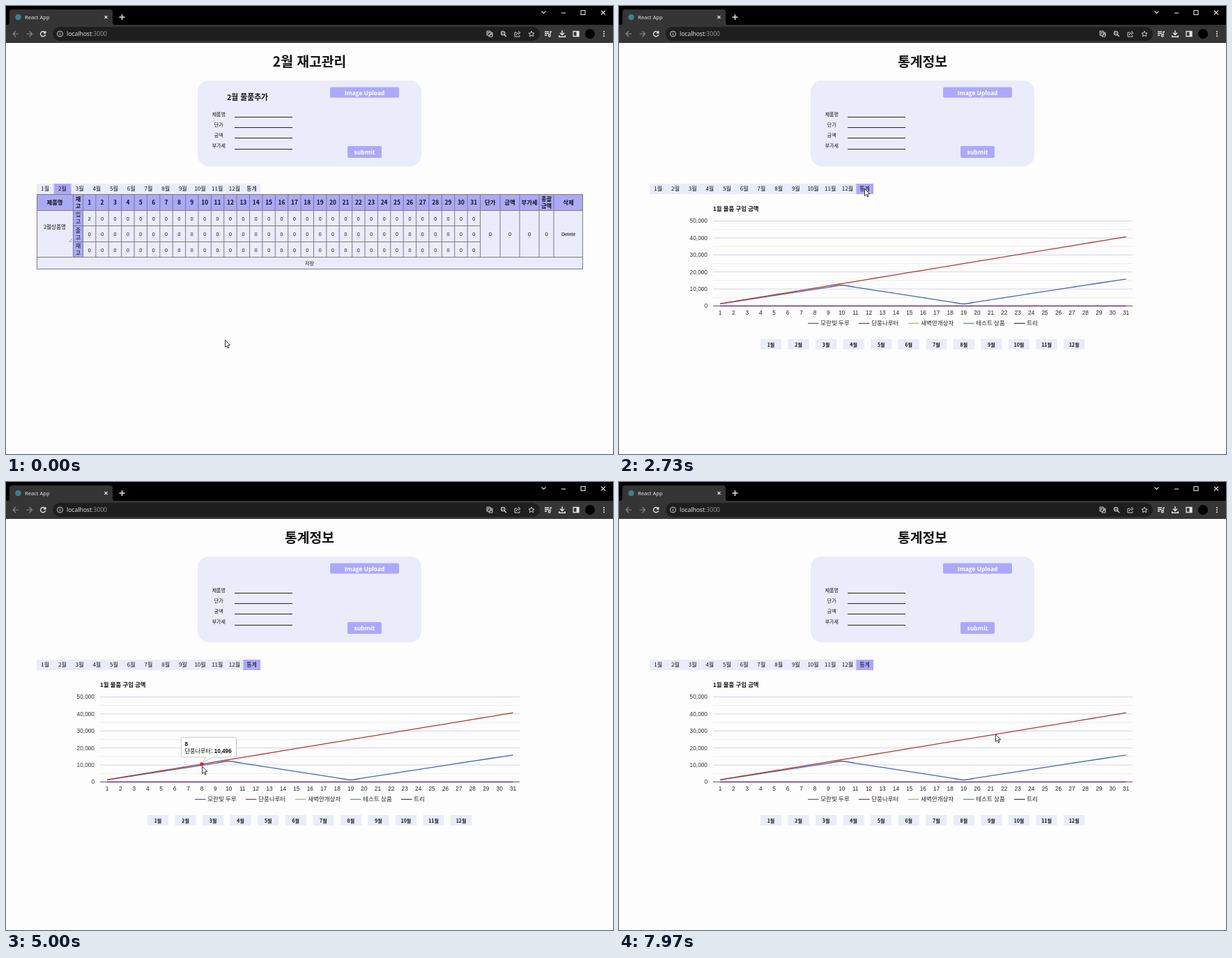
Recreate the animation shown at these times as an HTML page. Size 871 px wide and 643 px high, loop 8 s.

```html
<!DOCTYPE html>
<html lang="ko">
<head>
<meta charset="utf-8">
<title>재고관리</title>
<style>
html, body { margin: 0; width: 100%; height: 100%; overflow: hidden; background: #fdfdfd; }
svg { display: block; width: 871px; height: 643px; }
text { font-family: "Noto Sans CJK KR", "Noto Sans", sans-serif; white-space: pre; }
.ui { font-family: "Open Sans", "Noto Sans", sans-serif; }
.num { font-family: "Liberation Sans", "Noto Sans CJK KR", sans-serif; }
.icon { fill: none; stroke: #e4e4e4; stroke-width: 1.1; }
</style>
</head>
<body>
<svg id="stage" viewBox="0 0 871 643"></svg>
<script>
const LOOP = 8000, SWITCH = 2700;
const PALE = '#eaecfb', VIOLET = '#aca9fa', BORDER = '#7b7b84';
const stage = document.getElementById('stage');

function add(parent, tag, attrs = {}, content) {
  const node = document.createElementNS('http://www.w3.org/2000/svg', tag);
  for (const key in attrs) node.setAttribute(key, attrs[key]);
  if (content !== undefined) node.textContent = content;
  parent.appendChild(node);
  return node;
}
const group = (parent, attrs) => add(parent, 'g', attrs);
const rect = (g, x, y, width, height, fill, rx = 0) =>
  add(g, 'rect', { x, y, width, height, fill, rx });
const line = (g, x1, y1, x2, y2, stroke, width = 1) =>
  add(g, 'line', { x1, y1, x2, y2, stroke, 'stroke-width': width });
// y is the vertical middle of the text
const label = (g, str, x, y, size, opts = {}) =>
  add(g, 'text', { x, y: y + size * 0.36, 'font-size': size, 'text-anchor': 'middle', fill: '#111', ...opts }, str);
const bold = { 'font-weight': 700 };
const start = { 'text-anchor': 'start' };
const num = { class: 'num' };
const range = n => Array.from({ length: n }, (_, i) => i);

function drawBrowser(g) {
  rect(g, 0, 0, 871, 53, '#000');
  add(g, 'path', { d: 'M2 27Q5 27 5 24V9Q5 5 9 5H149Q153 5 153 9V24Q153 27 156 27Z', fill: '#353535' });
  rect(g, 0, 27, 871, 26, '#353535');
  rect(g, 67, 30, 699, 20, '#1e1e1f', 10);
  add(g, 'circle', { cx: 17.5, cy: 16, r: 4.3, fill: '#3f7f90' });
  label(g, 'React App', 27, 16, 7.6, { ...start, class: 'ui', fill: '#eee' });
  const url = label(g, '', 87, 40, 8.6, { ...start, class: 'ui', fill: '#f0f0f0' });
  add(url, 'tspan', {}, 'localhost');
  add(url, 'tspan', { fill: '#9a9a9a' }, ':3000');

  const icon = (d, x, y, attrs = {}) =>
    add(g, 'path', { class: 'icon', d, transform: `translate(${x} ${y})`, ...attrs });
  const cross = 'M-2 -2L2 2M2 -2L-2 2';
  icon(cross, 143.5, 16);
  icon('M-4 0H4M0 -4V4', 166.5, 16, { style: 'stroke-width:1.5' });
  icon('M-3 -1.5L0 1.5L3 -1.5', 771.5, 9);
  icon('M-3 0H3', 800, 10);
  icon('M-3 -3H3V3H-3Z', 828, 9.5);
  icon('M-3 -3L3 3M3 -3L-3 3', 857, 9.5);
  icon('M4 0H-4M0 -4L-4 0L0 4', 14, 40, { style: 'stroke:#8c8c8c' });
  icon('M-4 0H4M0 -4L4 0L0 4', 33.5, 40, { style: 'stroke:#8c8c8c' });
  icon('M3.3 -1.6A3.6 3.6 0 1 0 3.6 1M3.8 -4V-1.2H1', 53, 40, { style: 'stroke-width:1.4' });
  icon('M-4 0A4 4 0 1 0 4 0A4 4 0 1 0 -4 0M0 -.7V2.3M0 -2.3V-1.3', 77.5, 40, { style: 'stroke-width:.9' });
  icon('M-4 -4H1V2H-4ZM1 -2H4V4H-1V2M-3 -2H0M-1.5 -2L-3 1M1 2L2.5 -1L4 2', 694, 40, { style: 'stroke-width:.9' });
  icon('M-3.5 -1A2.7 2.7 0 1 0 1.9 -1A2.7 2.7 0 1 0 -3.5 -1M1 1L4 4M-2 -1H.4', 714, 40);
  icon('M-1 -2H-4V4H3V2M-2 2Q-1.5 -1.5 2 -1.5M1 -4L4 -1.5L1 1', 734, 40, { style: 'stroke-width:.9' });
  icon('M0 -4L1.2 -1.3L4 -1L1.9 .8L2.6 3.7L0 2.1L-2.6 3.7L-1.9 .8L-4 -1L-1.2 -1.3Z', 754, 40, { style: 'stroke-width:.9' });
  icon('M-5 -3H1M-5 -.5H1M-5 2H-2M5 -3H3V2.5M3 2.5A1.3 1.3 0 1 1 .5 2.5A1.3 1.3 0 1 1 3 2.5', 778, 40, { style: 'stroke-width:1.3' });
  icon('M0 -5V1M-3 -1.5L0 1.5L3 -1.5M-4.3 2V4.3H4.3V2', 798, 40, { style: 'stroke-width:1.4' });
  icon('M-4 -3.5H4V3.5H-4Z', 818, 40, { style: 'stroke-width:1.3' });
  rect(g, 818.5, 37, 3.5, 6.5, '#e4e4e4');
  add(g, 'circle', { cx: 838, cy: 40, r: 7, fill: '#000' });
  for (const y of [36.8, 40, 43.2]) add(g, 'circle', { cx: 858, cy: y, r: 1, fill: '#eee' });
}

function drawForm(g) {
  rect(g, 275, 107, 321, 123, PALE, 16);
  ['제품명', '단가', '금액', '부가세'].forEach((name, i) => {
    const y = Math.floor(159.2 + i * 15.3) + 0.5;
    label(g, name, 305.3, 155.3 + i * 15.2, 7);
    line(g, 328, y, 411, y, '#222');
  });
  const white = { ...bold, class: 'ui', fill: '#fff' };
  rect(g, 465, 116.5, 99, 15, VIOLET, 2);
  label(g, 'Image Upload', 514.5, 124.5, 8.4, white);
  rect(g, 490, 201, 49, 17, VIOLET, 2);
  label(g, 'submit', 514.5, 209.5, 8.6, white);
}

function drawTabs(g, active) {
  const step = 24.7;
  rect(g, 44, 255, step * 13, 15, PALE);
  rect(g, 44 + active * step, 255, step, 15, VIOLET);
  range(13).forEach(i => label(g, i < 12 ? `${i + 1}월` : '통계', 56.2 + i * step, 262.6, 8));
}

function drawTable(g) {
  const day = i => 110.5 + i * 18.387;
  const tail = [680.5, 709, 737, 765, 786, 828];
  const rows = [293.5, 315.5, 338.5, 360.5];
  const mid = i => (tail[i] + tail[i + 1]) / 2;
  rect(g, 44, 270, 784, 108, PALE);
  rect(g, 44, 270, 784, 23, VIOLET);
  rect(g, 96.5, 293, 14, 68, VIOLET);

  const stacked = (str, x, y, style) => {
    label(g, str.slice(0, str.length / 2), x, y - 5, 8.2, style);
    label(g, str.slice(str.length / 2), x, y + 5, 8.2, style);
  };
  label(g, '제품명', 70, 282, 8.4, bold);
  stacked('재고', 103.5, 282, bold);
  stacked('총괄금액', mid(3), 282, bold);
  ['단가', '금액', '부가세', , '삭제'].forEach((name, i) => label(g, name, mid(i), 282, 8.4, bold));
  range(31).forEach(i => label(g, i + 1, day(i + 0.5), 282, 8.4, bold));

  ['입고', '출고', '재고'].forEach((name, r) => {
    const y = (rows[r] + rows[r + 1]) / 2;
    stacked(name, 103.5, y);
    range(31).forEach(i => label(g, r + i ? 0 : 2, day(i + 0.5), y + 0.8, 7, num));
  });
  label(g, '2월상품명', 70, 317, 7.6);
  add(g, 'path', { d: 'M90 339L95 334M93 339L95 337', stroke: '#666', 'stroke-width': 0.7 });
  range(4).forEach(i => label(g, 0, mid(i), 327.3, 7.6, num));
  label(g, 'Delete', mid(4), 327.3, 7, num);
  label(g, '저장', 435.5, 369.5, 7);

  [96.5, ...range(31).map(day), ...tail.slice(0, 5)].forEach(x => line(g, x, 270, x, 361, BORDER));
  [44.5, 827.5].forEach(x => line(g, x, 270, x, 378, BORDER));
  [270.5, rows[0], rows[3], 377.5].forEach(y => line(g, 44, y, 828, y, BORDER));
  rows.slice(1, 3).forEach(y => line(g, 96.5, y, 680.5, y, BORDER));
}

const dayX = d => 145 + (d - 1) * 19.42;
const valueY = v => 430.5 - v * 0.00244;
const redValue = d => 1312 * d;
const blueValue = d => 1220 * (d <= 10 ? d : d <= 19 ? 20 - d : d - 18);
const SERIES = [
  ['모란빛 두루', '#4768b4', 271],
  ['단풍나루터', '#b33a2e', 344],
  ['새벽안개상자', '#e0a23a', 415],
  ['테스트 상품', '#4fa36a', 494],
  ['트리', '#6d2a80', 567],
];

function smoothPath(valueOf) {
  const slope = d => (valueOf(Math.min(31, d + 1)) - valueOf(Math.max(1, d - 1))) / (d > 1 && d < 31 ? 6 : 3);
  const point = (d, v) => `${dayX(d)} ${valueY(v)}`;
  let d = 'M' + point(1, valueOf(1));
  for (let i = 1; i < 31; i++) {
    d += `C${point(i + 1 / 3, valueOf(i) + slope(i))} ${point(i + 2 / 3, valueOf(i + 1) - slope(i + 1))} ${point(i + 1, valueOf(i + 1))}`;
  }
  return d;
}

function drawChart(g) {
  label(g, '1월 물품 구입 금액', 135, 291, 8.4, { ...start, ...bold, ...num });
  range(6).forEach(i => {
    const y = valueY(i * 10000);
    if (i < 5) line(g, 135, y - 12.2, 737, y - 12.2, '#ededf0');
    line(g, 135, y, 737, y, i ? '#d3d3ee' : '#55555f');
    label(g, (i * 10000).toLocaleString('en-US'), 127, y, 8.3, { ...num, 'text-anchor': 'end', fill: '#333' });
  });
  range(31).forEach(i => label(g, i + 1, dayX(i + 1), 440, 8.3, { ...num, fill: '#222' }));
  [[blueValue, 0], [redValue, 1], [() => 0, 4]].forEach(([valueOf, i]) =>
    add(g, 'path', { d: smoothPath(valueOf), fill: 'none', stroke: SERIES[i][1], 'stroke-width': 1.3 }));
  SERIES.forEach(([name, color, x]) => {
    line(g, x, 455.5, x + 15.5, 455.5, color, 1.3);
    label(g, name, x + 18.3, 455.3, 8.5, { ...start, ...num, fill: '#222' });
  });
  range(12).forEach(i => {
    rect(g, 203 + i * 39.55, 478, 30, 15, PALE);
    label(g, `${i + 1}월`, 218 + i * 39.55, 486, 7, bold);
  });
}

function drawTooltip(g) {
  add(g, 'circle', { r: 2.6, fill: '#c02f22' });
  add(g, 'path', { d: 'M-28.5 -37.5H50.5V-9.5H49.5V-37H-28V-9.5Z', fill: '#ddd' });
  add(g, 'path', {
    d: 'M-28 -38.5H48Q49.5 -38.5 49.5 -37V-11.5Q49.5 -10 48 -10H17L1.5 -2.5L6 -10H-28Q-29.5 -10 -29.5 -11.5V-37Q-29.5 -38.5 -28 -38.5Z',
    fill: '#fff', stroke: '#ccc', 'stroke-width': 1,
  });
  const style = { ...start, ...num };
  const day = label(g, '', -24.5, -29, 8.2, { ...style, ...bold });
  const row = label(g, '', -24.5, -19, 8.2, style);
  add(row, 'tspan', {}, SERIES[1][0] + ': ');
  return { day, value: add(row, 'tspan', bold) };
}

drawBrowser(group(stage));
drawForm(group(stage));
const stock = group(stage), stats = group(stage);
label(stock, '2월 재고관리', 435.5, 80.5, 19.3, bold);
label(stock, '2월 물품추가', 346.5, 131.5, 10.8, bold);
drawTabs(stock, 1);
drawTable(stock);
label(stats, '통계정보', 435.5, 80.5, 19.3, bold);
drawTabs(stats, 12);
drawChart(stats);
const tip = group(stats);
const tipText = drawTooltip(tip);
const cursor = add(stage, 'path', {
  d: 'M.5 .3V10.6L2.9 8.4L4.4 12L6 11.3L4.5 7.8H7.7Z', fill: '#fff', stroke: '#222', 'stroke-width': 0.9,
});

// time, x, y, eased
const PATH = [
  [0, 314, 479, 1], [1060, 640, 546, 1], [2070, 325, 220, 1], [2450, 352, 262, 0],
  [2800, 352, 262, 1], [3570, 289, 330, 1], [4700, 281, 408, 0], [5000, 281, 408, 0],
  [5940, 369, 388, 0], [7970, 540, 362, 0], [LOOP, 540, 362, 0],
];

function cursorAt(t) {
  const i = PATH.findIndex((p, n) => n && t <= p[0]);
  const [t0, x0, y0, eased] = PATH[i - 1], [t1, x1, y1] = PATH[i];
  let k = (t - t0) / (t1 - t0);
  if (eased) k = k * k * (3 - 2 * k);
  return [x0 + (x1 - x0) * k, y0 + (y1 - y0) * k];
}

const show = (node, on) => { node.style.display = on ? '' : 'none'; };

function render(t) {
  const [x, y] = cursorAt(t);
  cursor.setAttribute('transform', `translate(${x} ${y})`);
  show(stock, t < SWITCH);
  show(stats, t >= SWITCH);

  const day = Math.round((x - dayX(1)) / 19.42) + 1;
  const px = dayX(day), py = valueY(redValue(day));
  const hover = Math.hypot(x - px, y - py) < 6;
  show(tip, hover);
  if (hover) {
    tip.setAttribute('transform', `translate(${px} ${py})`);
    tipText.day.textContent = day;
    tipText.value.textContent = redValue(day).toLocaleString('en-US');
  }
}

const begin = performance.now();
function tick() {
  render((performance.now() - begin) % LOOP);
  requestAnimationFrame(tick);
}
tick();
</script>
</body>
</html>
```
